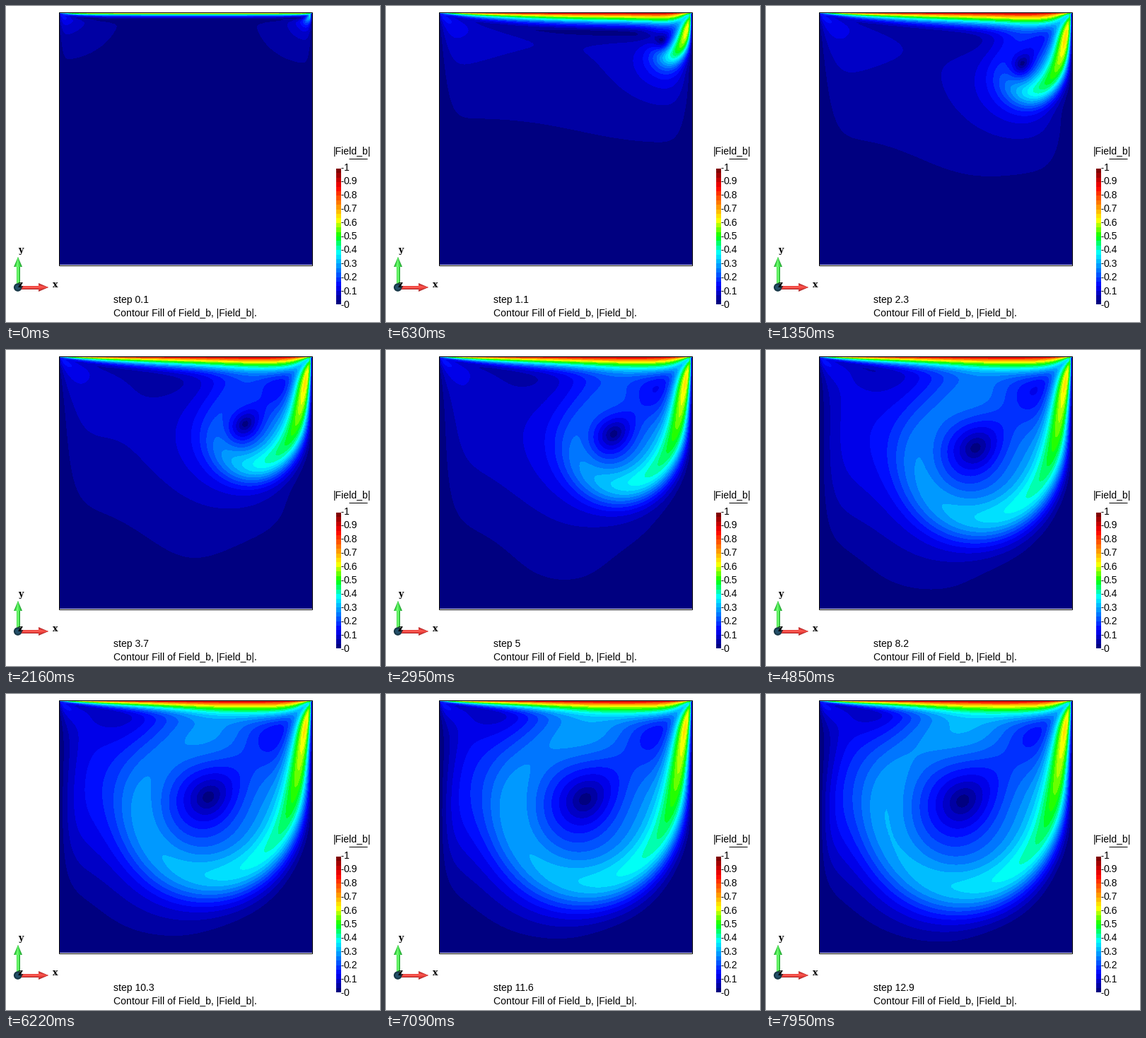
A matplotlib script for the animation above (8 s loop, 529x447 px).

```python
import numpy as np
import matplotlib.pyplot as plt
from matplotlib.animation import FuncAnimation
from matplotlib.colors import LinearSegmentedColormap
from matplotlib.patches import Circle, Polygon, Rectangle

W, H, DPI = 529, 447, 64
PX = 72 / DPI                     # one pixel in points
FRAMES, INTERVAL = 200, 40
LEFT, TOP, SIDE = 74.5, 8.5, 358  # cavity on the stage

# Lid-driven cavity, vorticity and stream function, rows run down from the lid
N, NU, SUB, LAST = 120, 1e-3, 25, 129
h, dt = 1 / N, 0.1 / SUB
k = np.arange(1, N)
S = np.sqrt(2 / N) * np.sin(np.pi * np.outer(k, k) / N)
lam = (2 - 2 * np.cos(np.pi * k / N)) / h**2
inv = 1 / (lam[:, None] + lam[None, :])


def ddx(f):
    return (f[1:-1, 2:] - f[1:-1, :-2]) / (2 * h)


def ddy(f):
    return (f[2:, 1:-1] - f[:-2, 1:-1]) / (2 * h)


def solve_psi(w, psi):
    psi[1:-1, 1:-1] = S @ ((S @ w[1:-1, 1:-1] @ S) * inv) @ S


def rate(w, psi):
    solve_psi(w, psi)
    w[0] = 2 / h - 2 * psi[1] / h**2
    w[-1] = -2 * psi[-2] / h**2
    w[:, 0] = -2 * psi[:, 1] / h**2
    w[:, -1] = -2 * psi[:, -2] / h**2
    lap = (w[1:-1, 2:] + w[1:-1, :-2] + w[2:, 1:-1] + w[:-2, 1:-1]
           - 4 * w[1:-1, 1:-1]) / h**2
    return NU * lap - ddy(psi) * ddx(w) + ddx(psi) * ddy(w)


def simulate():
    w = np.zeros((N + 1, N + 1))
    psi = np.zeros_like(w)
    old, fields = None, []
    for _ in range(LAST):
        for _ in range(SUB):
            new = rate(w, psi)
            w[1:-1, 1:-1] += dt * (new if old is None else 1.5 * new - 0.5 * old)
            old = new
        solve_psi(w, psi)
        speed = np.zeros_like(w)
        speed[1:-1, 1:-1] = np.hypot(ddx(psi), ddy(psi))
        speed[0] = 1
        fields.append(np.clip(speed, 0, 1))
    return fields


fields = simulate()

BANDS = 30
cmap = LinearSegmentedColormap.from_list("fill", [
    (0, "#000080"), (0.125, "#0000ff"), (0.375, "#00ffff"), (0.5, "#00ff00"),
    (0.625, "#ffff00"), (0.875, "#ff0000"), (1, "#800000")], N=BANDS)

plt.rcParams["font.family"] = "Liberation Sans"
fig = plt.figure(figsize=(W / DPI, H / DPI), dpi=DPI, facecolor="white")
ax = fig.add_axes([0, 0, 1, 1])
ax.axis("off")


def label(x, y, s, size=14, **kw):
    return ax.text(x, y, s, fontsize=size * PX, color="black", **kw)


def line(x0, x1, y):
    ax.plot([x0, x1], [y, y], color="black", lw=PX, solid_capstyle="butt")


def poly(points, color):
    ax.add_patch(Polygon(points, closed=True, fc=color, ec="none", zorder=3))


# Field
half = SIDE * h / 2
img = ax.imshow(fields[0], cmap=cmap, vmin=0, vmax=1, aspect="auto",
                interpolation="bilinear", interpolation_stage="data",
                extent=(LEFT - half, LEFT + SIDE + half,
                        TOP + SIDE + half, TOP - half))
box = Rectangle((LEFT, TOP), SIDE, SIDE, fc="none", ec="black", lw=PX, zorder=4)
ax.add_patch(box)
img.set_clip_path(box)

# Legend
for i in range(BANDS):
    y0, y1 = (422 - 192 * j / BANDS for j in (i, i + 1))
    ax.add_patch(Rectangle((467, y1), 7, y0 - y1, fc=cmap(i), ec="none"))
for i in range(11):
    y = 422.5 - 19.4 * i
    line(474, 476.5, y)
    label(478, y + 4.5, f"{i / 10:g}")
label(463, 210, "|Field_b|")
line(485, 511, 215.5)

# Axis triad
OX, OY = 17, 398


def arrow(along, light, mid, dark):
    def at(d, s):
        return (OX + d, OY + s) if along == "x" else (OX + s, OY - d)

    for a, b, c in ((-2.5, 2.5, dark), (-1.8, 1.5, mid), (-1, 0.5, light)):
        poly([at(4, a), at(31, a), at(31, b), at(4, b)], c)
    for a, b, c in ((-6, 6, dark), (-4.5, 4, mid), (-2.5, 0.8, light)):
        poly([at(29, a), at(43, 0), at(29, b)], c)


arrow("x", "#f85850", "#e83c38", "#b02c2c")
arrow("y", "#70f870", "#40e048", "#28a838")
for r, c in ((5.8, "#183848"), (3.6, "#24506a")):
    ax.add_patch(Circle((OX - 0.3, OY), r, fc=c, ec="none", zorder=4))
for x, y, s in ((20.5, 349, "y"), (70, 398, "x"), (20.5, 398, "z")):
    label(x, y, s, 12.5, family="DejaVu Serif", weight="bold", ha="center", zorder=5)

step_text = label(152, 420, "")
label(152, 439, "Contour Fill of Field_b, |Field_b|.")
ax.set_xlim(0, W)
ax.set_ylim(H, 0)

# Playback rate varies slightly, so the step count follows a few anchors
TICKS = [0, 20, 44, 56, 73, 93, 119]
STEPS = [1, 23, 50, 64, 82, 103, 129]


def draw(i):
    tick = int((i * INTERVAL + INTERVAL - 1) * 120 / 8000)
    n = int(np.interp(tick, TICKS, STEPS) + 0.5)
    img.set_data(fields[n - 1])
    step_text.set_text(f"step {n / 10:g}")
    return img, step_text


anim = FuncAnimation(fig, draw, frames=FRAMES, interval=INTERVAL, repeat=True)
plt.show()
```
